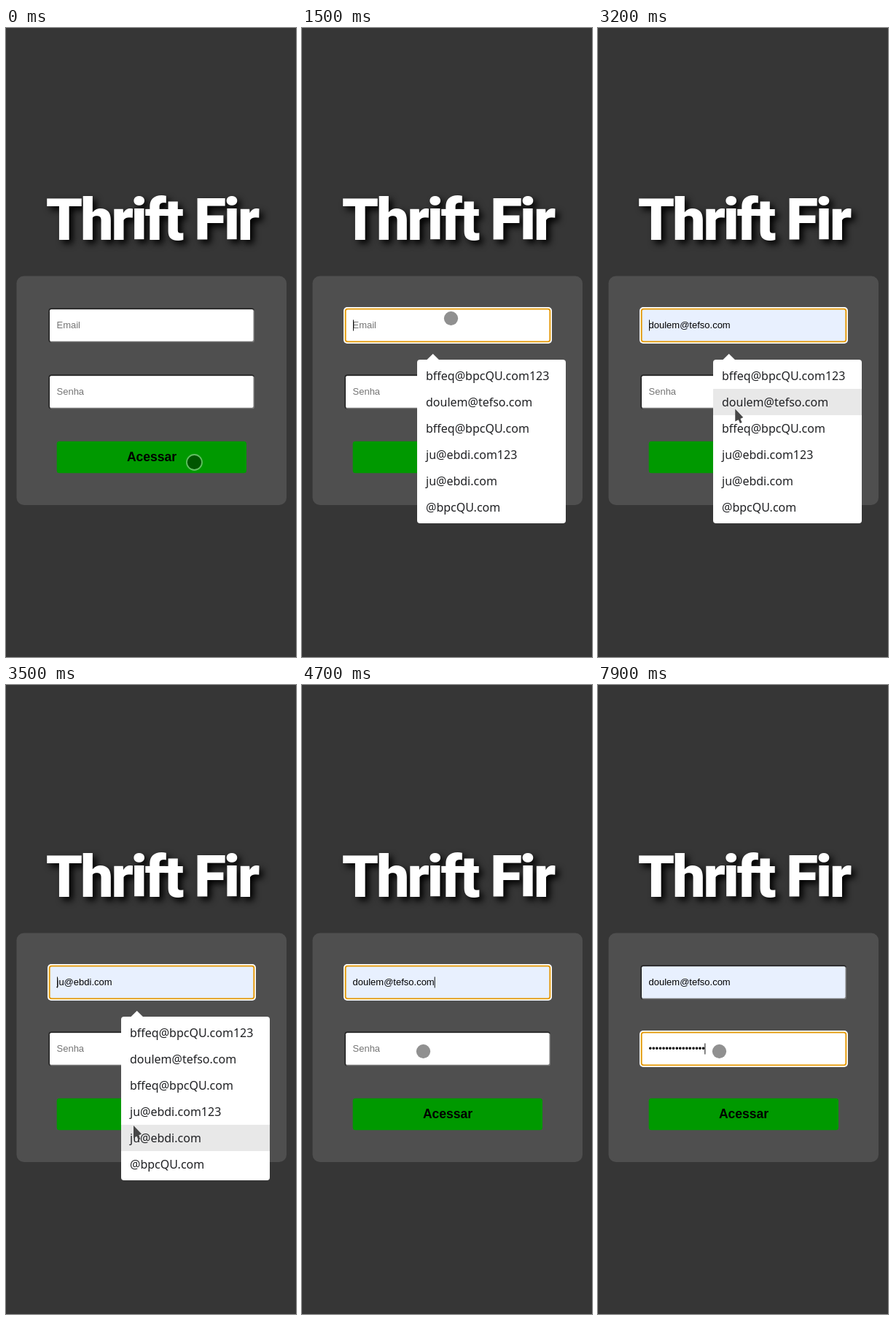
These frames come from a looping animation (398 px wide and 861 px high, 8 s). An HTML page with a canvas:

```html
<!DOCTYPE html>
<html lang="pt">
<head>
<meta charset="utf-8">
<title>Thrift Fir</title>
<style>
html, body { margin: 0; width: 100%; height: 100%; overflow: hidden; background: #363636; }
canvas { display: block; width: 398px; height: 861px; }
</style>
</head>
<body>
<canvas id="stage"></canvas>
<script>
const W = 398, H = 861, LOOP = 8000, STEP = 100;
const OPEN = 1500, PICK = 4300, NEXT = 6300, TYPE = 6700;
const canvas = document.getElementById('stage');
const ctx = canvas.getContext('2d');
const dpr = window.devicePixelRatio || 1;
canvas.width = W * dpr;
canvas.height = H * dpr;

const SANS = '"Liberation Sans", Arial, sans-serif';
const MENU = '"Noto Sans", "Open Sans", sans-serif';
const mails = ['bffeq@bpcQU.com123', 'doulem@tefso.com', 'bffeq@bpcQU.com',
  'ju@ebdi.com123', 'ju@ebdi.com', '@bpcQU.com'];
const menu = { x: 158, y: 454, w: 204, h: 224, row: 36, pad: 4 };

const linear = k => k;
const smooth = k => k * k * (3 - 2 * k);
const easeOut = k => 1 - (1 - k) ** 2;

const home = { x: 258.5, y: 594.5 };
const moves = [
  { from: 300, to: 700, x: 207.5, y: 385.5, ease: smooth },
  { from: 800, to: 1000, x: 204.5, y: 397.5, ease: linear },
  { from: 1700, to: 1900, x: 201.5, y: 412.5, ease: linear },
  { from: 2800, to: 2900, x: 201.5, y: 440, ease: linear },
  { from: 2900, to: 3500, x: 175, y: 603, ease: linear },
  { from: 3500, to: 4000, x: 204, y: 520, ease: easeOut },
  { from: PICK, to: 4700, x: 166.5, y: 501.5, ease: smooth }
];

function pointerAt(t) {
  let { x, y } = home;
  for (const m of moves) {
    const k = m.ease(Math.min(1, Math.max(0, (t - m.from) / (m.to - m.from))));
    x += (m.x - x) * k;
    y += (m.y - y) * k;
  }
  return { x, y };
}

function box(x, y, w, h, r, fill) {
  ctx.beginPath();
  ctx.roundRect(x, y, w, h, r);
  ctx.fillStyle = fill;
  ctx.fill();
}

function triangle(points, fill) {
  ctx.beginPath();
  points.forEach(([x, y]) => ctx.lineTo(x, y));
  ctx.closePath();
  ctx.fillStyle = fill;
  ctx.fill();
}

function text(str, x, y, font, fill, align = 'left') {
  ctx.font = font;
  ctx.textAlign = align;
  ctx.fillStyle = fill;
  ctx.fillText(str, x, y);
}

function title() {
  ctx.save();
  ctx.shadowColor = '#000';
  ctx.shadowOffsetX = ctx.shadowOffsetY = 5 * dpr;
  ctx.shadowBlur = 10 * dpr;
  ctx.letterSpacing = '-3px';
  text('Thrift Fir', 200, 290, '900 80px Roboto, Inter, sans-serif', '#fff', 'center');
  ctx.restore();
}

function field(y, fill, focus) {
  if (focus) {
    box(57, y - 2, 286, 50, 5, '#fff');
    box(58.7, y - 0.3, 282.6, 46.6, 4, '#e59700');
    box(60.6, y + 1.6, 278.8, 42.8, 2, fill);
  } else {
    box(58.5, y - 0.5, 282.3, 47, 3.5, '#202020');
    box(60, y + 1.2, 281, 45.3, 3, '#767676');
    box(60, y + 1.2, 279.5, 43.6, 2, fill);
  }
}

function caret(x, y) {
  ctx.fillStyle = '#111';
  ctx.fillRect(x, y - 7.5, 1, 15);
}

function dropdown(hover) {
  const { x, y, w, h, row, pad } = menu;
  triangle([[171, y + 0.5], [179.7, y - 8], [188.4, y + 0.5]], '#fff');
  box(x, y, w, h, 4, '#fff');
  if (hover >= 0) {
    ctx.fillStyle = '#e8e8e8';
    ctx.fillRect(x, y + pad + hover * row, w, row);
  }
  mails.forEach((m, i) => text(m, x + 12, y + 28 + i * row, '16px ' + MENU, '#202124'));
}

function touch({ x, y }) {
  ctx.beginPath();
  ctx.arc(x, y, 9.7, 0, Math.PI * 2);
  ctx.fillStyle = 'rgba(0,0,0,.435)';
  ctx.fill();
  ctx.beginPath();
  ctx.arc(x, y, 10.5, 0, Math.PI * 2);
  ctx.lineWidth = 1.8;
  ctx.strokeStyle = 'rgba(255,255,255,.38)';
  ctx.stroke();
}

function arrow({ x, y }) {
  triangle([[x, y], [x, y + 17], [x + 11, y + 11.5]], '#474747');
  ctx.beginPath();
  ctx.moveTo(x + 4.5, y + 11);
  ctx.lineTo(x + 8, y + 19);
  ctx.lineWidth = 3;
  ctx.strokeStyle = '#474747';
  ctx.stroke();
}

// 17 characters typed at an even pace
function dotCount(t) {
  return Math.max(0, Math.min(17, Math.round((t - TYPE + STEP) / STEP * 1.31)));
}

function draw(time) {
  const t = Math.floor((time % LOOP) / STEP) * STEP;
  const pos = pointerAt(t);
  const open = t >= OPEN && t < PICK;
  const top = menu.y + menu.pad;
  const onMenu = open && pos.y > top;
  const hover = onMenu ? Math.floor((pos.y - top) / menu.row) : -1;
  const chosen = t >= PICK ? mails[1] : mails[hover];
  const mailFocus = t >= OPEN && t < NEXT;
  const passFocus = t >= NEXT;
  const font = '13px ' + SANS;

  ctx.setTransform(dpr, 0, 0, dpr, 0, 0);
  ctx.fillStyle = '#363636';
  ctx.fillRect(0, 0, W, H);
  title();
  box(14.5, 339.5, 370.5, 313.5, 10, '#4f4f4f');

  field(384, chosen ? '#e8f0fe' : '#fff', mailFocus);
  text(chosen || 'Email', 69.5, 411, font, chosen ? '#000' : '#757575');
  if (mailFocus) caret(t >= PICK ? 69.5 + ctx.measureText(chosen).width : 70, 407);

  field(475, '#fff', passFocus);
  const dots = '•'.repeat(dotCount(t));
  text(dots || 'Senha', 69.5, 502, font, dots ? '#000' : '#757575');
  if (passFocus) caret(dots ? 69 + ctx.measureText(dots).width : 70, 498);

  box(69.7, 565.7, 260.3, 43.5, 3.5, '#009900');
  text('Acessar', 200, 593, 'bold 17.55px ' + SANS, '#000', 'center');

  if (open) dropdown(hover);
  (onMenu ? arrow : touch)(pos);
}

let start;
function tick(now) {
  start ??= now;
  draw(now - start);
  requestAnimationFrame(tick);
}
draw(0);
requestAnimationFrame(tick);
</script>
</body>
</html>
```
